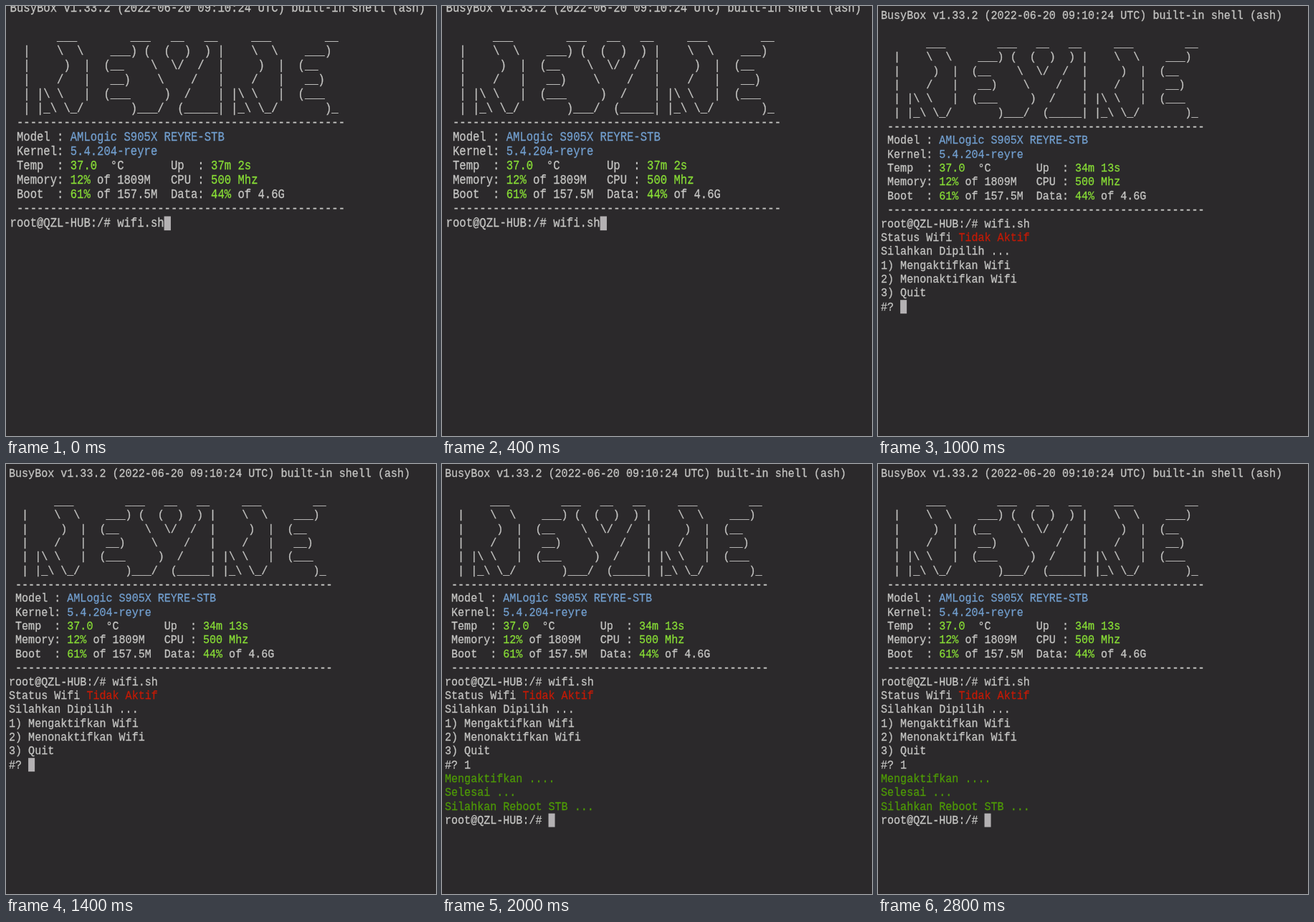
Write an HTML page with a canvas that moves like this. It is 600 px wide and 600 px high and loops after 3 s.

```html
<!DOCTYPE html>
<html>
<head>
<meta charset="utf-8">
<style>
html, body { margin: 0; width: 100%; height: 100%; overflow: hidden; background: #2b292b; }
canvas { display: block; width: 600px; height: 600px; }
</style>
</head>
<body>
<canvas id="stage" width="600" height="600"></canvas>
<script>
const ctx = document.getElementById('stage').getContext('2d');
const LOOP = 3000;
const COLORS = {
  text: '#c6c6c4', blue: '#729fcf', lime: '#88de36',
  green: '#4e9a06', red: '#c41a06', cursor: '#b4b1b3', back: '#2b292b'
};

const BANNER = String.raw`
       ___        ___   __   __     ___        __
  |    \  \    ___) (  (  )  ) |    \  \    ___)
  |     )  |  (__    \  \/  /  |     )  |  (__
  |    /   |   __)    \    /   |    /   |   __)
  | |\ \   |  (___     )  /    | |\ \   |  (___
  | |_\ \_/       )___/  (_____| |_\ \_/       )_`.split('\n').slice(1);
const RULE = ' ' + '-'.repeat(49);
const PROMPT = 'root@QZL-HUB:/# ';

// Inline colour spans are written as {name:text}.
const header = uptime => [
  'BusyBox v1.33.2 (2022-06-20 09:10:24 UTC) built-in shell (ash)',
  '',
  ...BANNER,
  RULE,
  ' Model : {blue:AMLogic S905X REYRE-STB}',
  ' Kernel: {blue:5.4.204-reyre}',
  ` Temp  : {lime:37.0}  °C       Up  : {lime:${uptime}}`,
  ' Memory: {lime:12%} of 1809M   CPU : {lime:500 Mhz}',
  ' Boot  : {lime:61%} of 157.5M  Data: {lime:44%} of 4.6G',
  RULE,
  PROMPT + 'wifi.sh'
];
const menu = [
  ...header('34m 13s'),
  'Status Wifi {red:Tidak Aktif}',
  'Silahkan Dipilih ...',
  '1) Mengaktifkan Wifi',
  '2) Menonaktifkan Wifi',
  '3) Quit',
  '#? '
];
const done = [
  ...menu.slice(0, -1),
  '#? 1',
  '{green:Mengaktifkan ....}',
  '{green:Selesai ...}',
  '{green:Silahkan Reboot STB ...}',
  PROMPT
];

// The terminal uses a 15px font on 17px rows; each view places and zooms it.
const FONT = 15, ROW = 17, BASE = 13;
const near = { x: 5.6, y: -6.9, zoomX: 1.0385, zoomY: 20 / ROW };
const far = { x: 4, y: 3.5, zoomX: 1.0035, zoomY: 19.35 / ROW };
const scenes = [
  { start: 0, view: near, lines: header('37m 2s') },
  { start: 1000, view: far, lines: menu },
  { start: 2000, view: far, lines: done }
];

function drawLine(line, y) {
  let x = 0;
  for (const part of line.split(/(\{\w+:[^}]*\})/)) {
    const span = part.match(/^\{(\w+):(.*)\}$/);
    const text = span ? span[2] : part;
    ctx.fillStyle = ctx.strokeStyle = COLORS[span ? span[1] : 'text'];
    ctx.fillText(text, x, y);
    ctx.strokeText(text, x, y);
    x += ctx.measureText(text).width;
  }
  return x;
}

function drawScene({ view, lines }) {
  ctx.resetTransform();
  ctx.fillStyle = COLORS.back;
  ctx.fillRect(0, 0, 600, 600);
  ctx.setTransform(view.zoomX, 0, 0, view.zoomY, view.x, view.y);
  ctx.font = `${FONT}px "Liberation Mono", monospace`;
  ctx.lineWidth = 0.25;
  let end = 0;
  lines.forEach((line, i) => {
    end = drawLine(line, i * ROW + BASE);
  });
  ctx.fillStyle = COLORS.cursor;
  ctx.fillRect(end, (lines.length - 1) * ROW + 0.3, 9, ROW - 0.3);
}

function frame(now) {
  const t = now % LOOP;
  drawScene(scenes.filter(s => s.start <= t).pop());
  requestAnimationFrame(frame);
}
requestAnimationFrame(frame);
</script>
</body>
</html>
```
